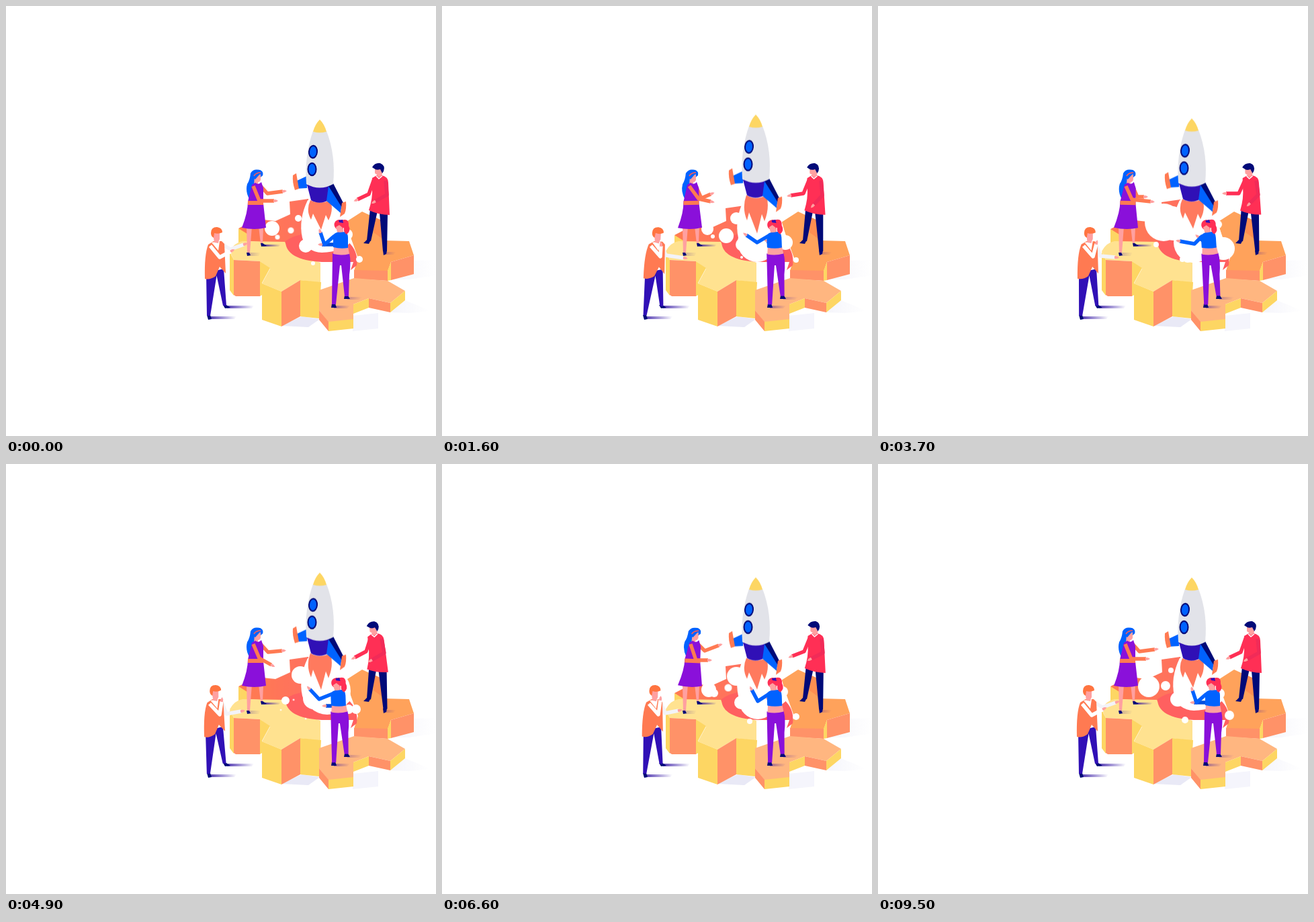
An HTML page without scripts for the animation above (9.6 s loop, 640 by 640 pixels).

```html
<!DOCTYPE html>
<html lang="en">
<head>
<meta charset="utf-8">
<title>Rocket launch team</title>
<style>
html, body { margin: 0; width: 100%; height: 100%; overflow: hidden; background: #fff; }
svg { display: block; width: 100%; height: 100%; }

.rocket { animation: hover 1.6s cubic-bezier(.37, 0, .63, 1) infinite alternate; }
.flame { transform-origin: 467px 290px; }
.move, .puffs circle { animation: move 9.6s linear infinite; }
.sway { animation: sway 9.6s linear infinite; }
.arm {
  fill: none; stroke-width: 5.4; stroke-linejoin: round; marker-end: url(#hand);
  d: var(--a); animation: reach 9.6s linear infinite;
}

@keyframes hover { to { transform: translateY(-7.4px); } }
@keyframes move {
  0%, 100% { transform: var(--a); }
  16.67% { transform: var(--b); }
  38.54% { transform: var(--c); }
  51.04% { transform: var(--d); }
  68.75% { transform: var(--e); }
  83.33% { transform: var(--f); }
  98.96% { transform: var(--g, var(--a)); }
}
@keyframes sway {
  0%, 98.96%, 100% { rotate: 0deg; }
  16.67% { rotate: var(--b); }
  38.54% { rotate: var(--c); }
  51.04% { rotate: var(--d); }
  68.75% { rotate: var(--e); }
  83.33% { rotate: var(--f); }
}
@keyframes reach {
  0%, 98.96%, 100% { d: var(--a); }
  16.67% { d: var(--b); }
  38.54% { d: var(--c); }
  51.04% { d: var(--d); }
  68.75% { d: var(--e); }
  83.33% { d: var(--f); }
}

.navy { fill: #000a78; }
.indigo { fill: #3010b6; }
.blue { fill: #0062ff; }
.purple { fill: #8a10da; }
.red { fill: #ff2f55; }
.orange { fill: #ff7a52; }
.skin { fill: #ffa0a0; }
.gold { fill: #fdd663; }
.peach { fill: #ff9268; }
</style>
</head>
<body>
<svg viewBox="0 0 640 640">
<defs>
  <linearGradient id="cast">
    <stop stop-color="#2a0ca0" stop-opacity=".85"/>
    <stop offset="1" stop-color="#2a0ca0" stop-opacity="0"/>
  </linearGradient>
  <linearGradient id="haze">
    <stop stop-color="#f5f5fb"/>
    <stop offset="1" stop-color="#fff"/>
  </linearGradient>
  <linearGradient id="wall">
    <stop stop-color="#ff7c50"/>
    <stop offset="1" stop-color="#ff7060"/>
  </linearGradient>
  <marker id="hand" markerUnits="userSpaceOnUse" markerWidth="10" markerHeight="8" refX="2" refY="4" orient="auto">
    <path class="skin" d="M1 2L5 2.2L8 4L5 5.7L1 6z"/>
  </marker>
</defs>

<!-- ground shadows -->
<g fill="url(#haze)">
  <path d="M573 407L607 379L640 378V401L600 407z"/>
  <path d="M572 456L594 438L632 454L600 457z"/>
</g>
<path fill="#f5f5fc" d="M516 461L554 457V480L516 484z"/>
<path fill="#e9e9f6" d="M410 476L440 462L467 466L450 478z"/>

<!-- gear, back wall -->
<g class="move" style="--a:translateY(0);--b:translateY(10px);--c:translateY(1px);--d:translateY(0);--e:translateY(10px);--f:translateY(5px)">
  <path class="gold" d="M346 331L359 337V352H346z"/>
  <path fill="url(#wall)" d="M346 331L373 317L401 320L423 310L422 291L450 287L456 355L418 360L396 352L359 350V339z"/>
</g>

<!-- gear, left part -->
<path fill="#ffe290" d="M333 365Q340 352 352 350L415 351L422 366L468 382V412L438 408L410 425L381 413L393 391L378 380L339 378z"/>
<path class="gold" d="M333 366L339 378V431L333 423zM378 380L393 390L381 412V430L378 432zM381 413L410 425V477L381 467zM438 408L469 411L466 465L438 462z"/>
<path class="peach" d="M339 378L378 380V432H342L339 430zM410 425L438 408V462L410 477z"/>

<!-- gear, right part -->
<path fill="#ffa25b" d="M505 322L530 306L556 318L562 349L600 350L607 371L573 381L568 395L518 394L524 375L515 350z"/>
<path fill="#ff8e51" d="M548 314L557 318L561 347L547 337z"/>
<path class="peach" d="M573 381L607 371V399L573 408zM518 393L568 394V409L518 406z"/>
<path class="gold" d="M568 394L573 381V408L568 409z"/>

<!-- gear, front part -->
<path fill="#ffb680" d="M466 423L518 405L568 409L594 424L572 442L540 435L517 444V467L480 471L466 453z"/>
<path class="peach" d="M466 453L480 470V484L466 467zM540 435L572 442V456L540 449z"/>
<path class="gold" d="M480 470L517 466V480L480 484zM517 444L540 435V449L517 458zM572 442L594 424V438L572 456z"/>

<!-- crater and smoke -->
<path fill="#ff6060" d="M416 350Q428 341 450 338L508 350Q525 364 522 386L513 393L517 381H470Q416 378 416 350z"/>
<path fill="#fff" d="M449 289Q435 318 441 345Q447 366 470 367Q502 366 514 350L506 322L490 296z"/>
<g class="puffs" fill="#fff">
  <circle r="1" style="--a:translate(396px,331px) scale(11);--b:translate(395px,332px) scale(9);--c:translate(425px,322px) scale(28);--d:translate(416px,352px) scale(6);--e:translate(397px,336px) scale(11);--f:translate(396px,333px) scale(10);--g:translate(403px,331px) scale(16)"/>
  <circle r="1" style="--a:translate(424px,334px) scale(4.5);--b:translate(423px,342px) scale(11);--c:translate(440px,325px) scale(24);--d:translate(428px,351px) scale(1.3);--e:translate(426px,333px) scale(5.5);--f:translate(424px,334px) scale(4.5);--g:translate(428px,330px) scale(7)"/>
  <circle r="1" style="--a:translate(435px,316px) scale(5);--b:translate(438px,316px) scale(9);--c:translate(438px,313px) scale(15);--d:translate(438px,314px) scale(13);--e:translate(438px,316px) scale(14);--f:translate(440px,313px) scale(8);--g:translate(436px,307px) scale(4)"/>
  <circle r="1" style="--a:translate(446px,357px) scale(10);--b:translate(447px,355px) scale(10);--c:translate(461px,374px) scale(8);--d:translate(458px,349px) scale(16);--e:translate(445px,355px) scale(10);--f:translate(447px,357px) scale(11);--g:translate(446px,350px) scale(11)"/>
  <circle r="1" style="--a:translate(468px,339px) scale(27);--b:translate(469px,352px) scale(29);--c:translate(470px,352px) scale(30);--d:translate(478px,338px) scale(35);--e:translate(470px,352px) scale(28);--f:translate(468px,354px) scale(27);--g:translate(468px,338px) scale(27)"/>
  <circle r="1" style="--a:translate(508px,340px) scale(8);--b:translate(511px,352px) scale(11);--c:translate(514px,361px) scale(17);--d:translate(521px,365px) scale(7);--e:translate(507px,339px) scale(8);--f:translate(517px,360px) scale(9);--g:translate(508px,342px) scale(8)"/>
  <circle r="1" style="--a:translate(526px,377px) scale(5);--b:translate(527px,378px) scale(4);--c:translate(506px,325px) scale(6);--d:translate(510px,365px) scale(7);--e:translate(527px,376px) scale(5);--f:translate(526px,377px) scale(5);--g:translate(523px,374px) scale(7)"/>
  <circle r="1" style="--a:translate(404px,344px) scale(3.5);--b:translate(403px,343px) scale(3);--c:translate(414px,355px) scale(4);--d:translate(409px,366px) scale(1.2);--e:translate(405px,341px) scale(6);--f:translate(419px,348px) scale(8);--g:translate(406px,342px) scale(4)"/>
  <circle r="1" style="--a:translate(457px,383px) scale(3);--b:translate(446px,374px) scale(2);--c:translate(453px,377px) scale(4);--d:translate(446px,379px) scale(1.2);--e:translate(458px,383px) scale(4);--f:translate(457px,383px) scale(4);--g:translate(457px,381px) scale(5)"/>
</g>

<!-- rocket -->
<g class="rocket">
  <path class="flame move" fill="#ff7a5e" style="--a:scaleY(1);--b:scaleY(1.3);--c:scaleY(1);--d:scaleY(1.24);--e:scaleY(1.07);--f:scaleY(.9)" d="M453 289Q467 296 483 289Q488 304 480 319L476 311L469 333L457 309L454 318Q446 304 453 289z"/>
  <path class="blue" d="M431 261L448 253V271L431 272z"/>
  <path class="orange" d="M427 252L432 249L436 272L430 274Q426 262 427 252z"/>
  <path class="indigo" d="M448 266H487L482 288Q467 297 454 289z"/>
  <path class="blue" d="M480 268L500 294L498 308L477 290z"/>
  <path class="navy" d="M480 268L487 264L502 293L500 300z"/>
  <path class="orange" d="M500 293L506 291Q507 302 504 309L497 314z"/>
  <path fill="#e2e3e9" d="M457 186H477Q491 222 487 265Q467 276 447 265Q444 222 457 186z"/>
  <path class="gold" d="M467 169Q474 176 477 187Q467 190 457 187Q460 176 467 169z"/>
  <g class="navy">
    <ellipse cx="457" cy="217" rx="7" ry="10.3" transform="rotate(5 457 217)"/>
    <ellipse cx="455.5" cy="243" rx="7" ry="10.3"/>
  </g>
  <g class="blue">
    <ellipse cx="457" cy="217" rx="5" ry="8" transform="rotate(5 457 217)"/>
    <ellipse cx="455.5" cy="243" rx="5" ry="8"/>
  </g>
</g>

<!-- cast shadows of the people -->
<g fill="url(#cast)">
  <path d="M301 462H343L340 466H302z"/>
  <path d="M327 446H369L366 450H329z"/>
  <path d="M382 355H409L406 358H383z"/>
  <path opacity=".3" d="M360 367H379L376 372H361z"/>
  <path opacity=".3" d="M508 433H530L526 437H508z"/>
  <path opacity=".5" d="M488 446H512L508 450H488z"/>
  <path opacity=".3" d="M563 366H580L577 370H563z"/>
</g>

<!-- woman in the dress -->
<g>
  <path class="skin" d="M358 328H366L363 367H359zM376 328H383L382 354H379z"/>
  <path class="navy" d="M358 367H362L364 371L359 372zM379 353H382L388 357L380 358z"/>
  <path class="arm" stroke="#ff7a52" stroke-width="5" style="--a:path('M379 268L389 279L412 276');--b:path('M378 268L386 286L400 280');--c:path('M379 268L386 284L396 284');--d:path('M379 268L390 280L411 278');--e:path('M381 268L391 278L412 270');--f:path('M382 268L391 287L408 288')"/>
  <g class="sway" style="transform-origin:372px 330px;--b:-.8deg;--c:.7deg;--d:0deg;--e:2deg;--f:2.5deg">
    <path class="blue" d="M364 249Q368 242 377 244Q384 246 382 252L372 262Q368 267 369 274Q369 285 362 287Q356 276 359 265Q363 259 364 249z"/>
    <path class="skin" d="M370 253L379 250L379 259Q377 263 375 262V267H369z"/>
    <path class="blue" d="M365 254Q368 242 378 244Q383 246 382 253L378 250L371 258z"/>
    <path fill="none" stroke="#ff5a55" stroke-width="1.7" d="M369 253Q372 248 379 248"/>
    <path class="purple" d="M366 266L371 263Q376 267 380 262L383 271V294L387 330Q370 334 351 330Q360 307 360 291z"/>
    <path class="orange" d="M360 290H383V296H360z"/>
  </g>
  <path class="arm" stroke="#ff7a52" style="--a:path('M368 268L377 290L399 290');--b:path('M368 268L382 287L400 291');--c:path('M369 268L378 288L406 291');--d:path('M368 268L377 289L395 299');--e:path('M370 268L378 292L396 292');--f:path('M371 268L380 291L398 297')"/>
</g>

<!-- man in the red sweater -->
<g>
  <path class="navy" d="M537 348H543L540 354L532 353zM561 364H567L566 369L562 371z"/>
  <g class="sway" style="transform-origin:555px 350px;--b:-1deg;--c:-1.5deg;--d:-2deg;--e:-.3deg;--f:-2deg">
    <path class="navy" d="M542 302L553 305L543 350L537 349zM556 308L568 310L567 365L561 365z"/>
  </g>
  <path class="arm" stroke="#ff2f55" style="--a:path('M548 257L540 280L523 288');--b:path('M547 257L538 279L519 282');--c:path('M547 257L537 279L518 279');--d:path('M543 257L536 279L519 288');--e:path('M548 257L539 279L521 286');--f:path('M544 257L537 280L519 287')"/>
  <g class="sway" style="transform-origin:555px 335px;--b:-1.1deg;--c:-1.7deg;--d:-5deg;--e:-.4deg;--f:-4deg">
    <path class="skin" d="M549 241H560V250L558 256H552V251L549 249z"/>
    <path class="navy" d="M545 240Q549 233 557 234Q565 237 562 246L560 249L557 243Q551 245 548 242z"/>
    <path class="red" d="M545 256L552 252Q555 258 559 252Q569 254 569 263L571 311Q555 311 540 304Q546 286 545 270z"/>
    <path fill="none" stroke="#fff" stroke-width="1.5" d="M551 253L555 257L560 253"/>
  </g>
  <path class="arm" stroke="#f12b58" stroke-width="5" style="--a:path('M565 260L567 281L549 291');--b:path('M564 260L566 282L553 296');--c:path('M563 260L566 281L553 294');--d:path('M559 260L563 281L544 292');--e:path('M565 260L567 281L549 290');--f:path('M560 260L566 282L556 296')"/>
</g>

<!-- man in the vest -->
<g>
  <path class="navy" d="M299 460H304L306 466L301 467zM323 445H328L334 449L326 450z"/>
  <path class="arm" stroke="#f3f3f8" style="--a:path('M322 355L334 362L354 355');--b:path('M328 358L333 371L360 375');--c:path('M325 356L331 372L353 374');--d:path('M322 356L328 372L350 368');--e:path('M326 356L332 371L352 367');--f:path('M325 356L331 374L351 378')"/>
  <g class="sway" style="transform-origin:312px 470px;--b:3.4deg;--c:.8deg;--d:-.8deg;--e:1.5deg;--f:.8deg">
    <path class="indigo" d="M298 400L315 392L304 461H299zM312 394L324 391L328 446H323z"/>
    <path class="orange" d="M301 355L309 350H321L325 354L327 398L318 388L312 402Q304 408 296 406Q295 370 301 355z"/>
    <path fill="#fff" d="M306 352L318 350L316 364z"/>
    <path class="skin" d="M308 338H318V347Q316 350 316 353L310 352z"/>
    <path fill="#ff7440" d="M305 338Q305 329 314 329Q322 330 322 337Q316 340 310 338L309 345Q305 343 305 338z"/>
  </g>
  <path class="arm" stroke="#fff" style="--a:path('M304 357L318 374L335 365');--b:path('M311 357L325 373L326 357');--c:path('M306 357L320 373L325 354');--d:path('M303 357L318 373L321 353');--e:path('M308 357L322 373L325 351');--f:path('M306 357L319 374L322 356')"/>
</g>

<!-- woman with the ponytail -->
<g>
  <path class="navy" d="M485 443H490L492 449L484 449zM504 431H509L512 436L503 436z"/>
  <path class="arm" stroke="#004fe0" stroke-width="5" style="--a:path('M504 343L488 355L470 355');--b:path('M500 345L491 354L484 350');--c:path('M497 345L486 351L477 344');--d:path('M500 345L490 360L476 360');--e:path('M501 345L492 354L486 350');--f:path('M503 343L493 354L487 350')"/>
  <g class="sway" style="transform-origin:497px 440px;--b:-2.2deg;--c:-3.7deg;--d:-2.2deg;--e:-2deg;--f:0deg">
    <path class="purple" d="M486 368H511Q514 380 511 400L510 432H504L499 386H497L491 444H485z"/>
    <path class="skin" d="M488 358H509L511 369Q499 372 487 369zM493 329H502V339H493z"/>
    <path class="blue" d="M487 341Q491 336 497 337L505 336Q509 338 509 345V360Q498 362 487 359z"/>
    <circle class="red" cx="496" cy="325.5" r="7.5"/>
    <path class="red" d="M499 319Q511 315 510 327Q514 335 507 340Q502 337 503 331Q499 326 499 319z"/>
    <path class="skin" d="M491 329L496 326L501 330L498 336H493z"/>
    <path class="indigo" d="M495 319L501 318L502 323L496 322z"/>
  </g>
  <path class="arm" stroke="#0062ff" style="--a:path('M489 342L474 355L468 337');--b:path('M486 342L469 352L453 341');--c:path('M483 342L471 354L449 350');--d:path('M486 342L466 350L452 335');--e:path('M487 342L470 353L461 336');--f:path('M489 342L469 343L462 320')"/>
</g>
</svg>
</body>
</html>
```
